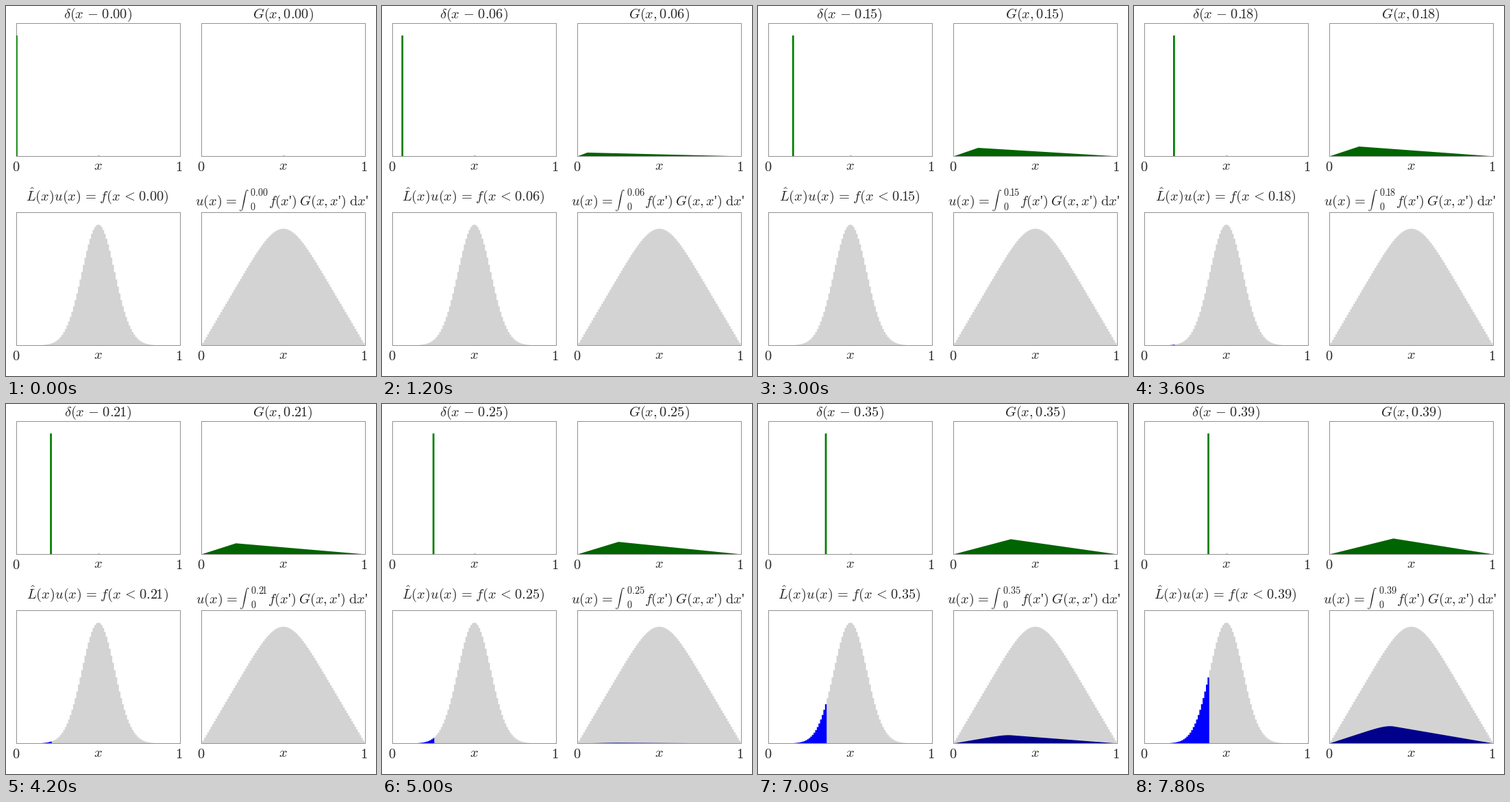
These frames come from a looping animation (540 by 540 pixels, 8000 ms). A matplotlib script:

```python
import numpy as np
import matplotlib.pyplot as plt
from matplotlib.animation import FuncAnimation
from matplotlib.patches import PathPatch, Polygon
from matplotlib.textpath import TextPath
from matplotlib.transforms import Affine2D

plt.rcParams.update({"mathtext.fontset": "cm", "font.family": "Liberation Serif"})

SIZE, DPI, STEPS = 540, 100, 40
PX = 72 / DPI
FONT = 14.7
SMALL = FONT * 0.7
INK = "0.15"
GAP = r"\hspace{0.12}"  # extra room around operators
MINUS, EQUAL, LESS = (GAP + op + GAP for op in "-=<")

DX = 0.01
x = np.arange(101) * DX
edges = np.append(x, 1 + DX) - DX / 2
source = np.exp(-(x - 0.5) ** 2 / (2 * 0.1 ** 2))
# Green's function of -u'' = f with u(0) = u(1) = 0
green = np.minimum.outer(x, x) - np.outer(x, x)
partial = np.cumsum(green * source[:, None] * DX, axis=0)

fig = plt.figure(figsize=(SIZE / DPI, SIZE / DPI), dpi=DPI, facecolor="white")


def put(px, py, text, size=FONT, ha="center"):
    """Text with its baseline at a pixel position counted from the top left."""
    return fig.text(px / SIZE, 1 - py / SIZE, text, fontsize=size, color=INK,
                    ha=ha, va="baseline")


def panel(left, top, ymax):
    w, h = 238.9, 194
    ax = fig.add_axes([left / SIZE, 1 - (top + h) / SIZE, w / SIZE, h / SIZE])
    ax.set(xlim=(0, 1), ylim=(0, ymax), xticks=[0.5], xticklabels=[], yticks=[])
    ax.patch.set_visible(False)
    ax.tick_params(direction="in", length=2 * PX, width=PX, color="0.6")
    for spine in ax.spines.values():
        spine.set(linewidth=PX, color="0.57")
    base = top + h
    put(left - 0.5, base + 22, "$0$")
    put(left + w / 2 - 0.7, base + 20, "$x$")
    put(left + w - 1.7, base + 22, "$1$")
    return ax


def steps(ax, heights, color, zorder=3):
    return ax.stairs(heights, edges, fill=True, color=color, lw=0,
                     snap=False, zorder=zorder)


def area(ax, color):
    return ax.add_patch(Polygon([(0, 0), (1, 0)], color=color, lw=0,
                                snap=False, zorder=4))


def floor(ax):
    return ax.plot([], [], color="blue", alpha=0.3, lw=PX, zorder=5,
                   solid_capstyle="butt")[0]


ax_delta = panel(15.4, 25.4, 1.1)
ax_green = panel(285.4, 25.4, 2.0)
ax_source = panel(15.4, 301.4, 1.1)
ax_sol = panel(285.4, 301.4, 0.06)

DELTA_W = 0.0115
delta_bar = ax_delta.bar([0], [1], width=DELTA_W, color="green", lw=0,
                         snap=False, zorder=3)[0]
green_area = area(ax_green, "darkgreen")
steps(ax_source, source, "lightgray")
steps(ax_sol, partial[-1], "lightgray")
source_steps = steps(ax_source, 0 * x, "blue", 4)
sol_area = area(ax_sol, "darkblue")
source_floor, sol_floor = floor(ax_source), floor(ax_sol)

delta_title = put(133.7, 17.5, "")
green_title = put(404, 17.5, "")
source_title = put(133.7, 283.6, "")

# The integral title is set in pieces around a tall integral sign.
lhs = put(0, 290.8, f"$u(x){EQUAL}$", ha="left")
upper = put(0, 277, "", SMALL, "left")
lower = put(0, 298, "$0$", SMALL, "left")
rhs = put(0, 290.8, r"$f(x$'$)\:G(x,x$'$)\;\mathrm{d}x$'", ha="left")
sign_path = TextPath((0, 0), r"$\int$", size=20)
sign_box = sign_path.get_extents()
sign = fig.add_artist(PathPatch(sign_path, color=INK, lw=0))


def kerned(value):
    """Set the digit 1 closer to its neighbours."""
    out = value[0]
    for a, b in zip(value, value[1:]):
        if "1" in (a, b):
            # mathtext puts 0.2 after a dot that no digit follows directly
            out += rf"\hspace{{{-0.3 if a == '.' else -0.1}}}"
        out += b
    return out


def text_width(text):
    return TextPath((0, 0), text, size=SMALL / PX).get_extents().width


full_width = text_width("$0.00$")


def place_integral(number):
    upper.set_text(f"${number}$")
    shift = (full_width - text_width(f"${number}$")) / 2
    for part, px in ((lhs, 276), (upper, 356.5), (lower, 356.5)):
        part.set_x((px + shift) / SIZE)
    rhs.set_x((383.3 - shift) / SIZE)
    sign.set_transform(
        Affine2D().translate(-sign_box.x0, -sign_box.y0)
        .scale(31.5 / sign_box.height)
        .translate(341 + shift, SIZE - 299.5)
        .scale(1 / SIZE) + fig.transFigure)


def draw(k):
    at = k * DX
    number = kerned(f"{at:.2f}")
    delta_title.set_text(rf"$\delta(x{MINUS}{number})$")
    green_title.set_text(f"$G(x,{number})$")
    source_title.set_text(rf"$\hat{{L}}(x)u(x){EQUAL}f(x{LESS}{number})$")
    place_integral(number)

    delta_bar.set_x(at - DELTA_W / 2)
    green_area.set_xy([(0, 0), (at, green[k, k]), (1, 0)])
    source_steps.set_data(values=np.where((x < at + DX / 2) & (k > 0), source, 0))
    sol_area.set_xy(np.column_stack([x, partial[k]]))
    reach = at + DX / 2 if k else 0
    source_floor.set_data([0, reach], [0, 0])
    sol_floor.set_data([0, 1 if k else 0], [0, 0])


anim = FuncAnimation(fig, draw, frames=STEPS, interval=200, repeat=True,
                     repeat_delay=0, init_func=lambda: draw(0), blit=False)
plt.show()
```
